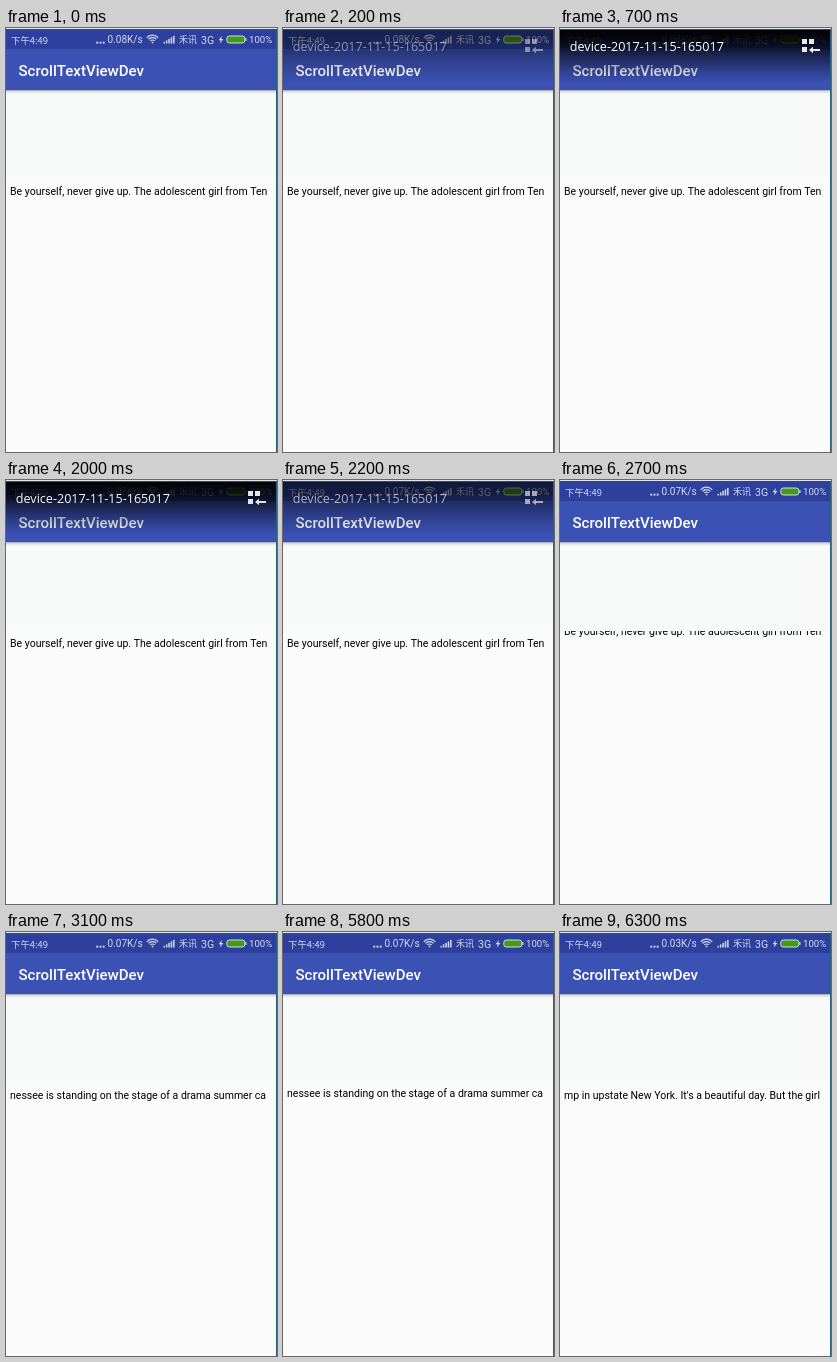
Animation of 271x424 px, one loop 8 s. Source, as an HTML page with a canvas:

```html
<!DOCTYPE html>
<html lang="en">
<head>
<meta charset="utf-8">
<title>Scrolling text view</title>
<style>
  html, body { margin: 0; width: 100%; height: 100%; overflow: hidden; background: #fafbfa; }
  canvas { display: block; width: 271px; height: 424px; }
</style>
</head>
<body>
<canvas id="stage"></canvas>
<script>
const W = 271, H = 424, LOOP = 8000, STEP = 100;
const ROBOTO = 'Roboto, sans-serif';
const CJK = '"Noto Sans CJK SC", "Noto Sans CJK", sans-serif';
const LINES = [
  'Be yourself, never give up. The adolescent girl from Ten',
  'nessee is standing on the stage of a drama summer ca',
  "mp in upstate New York. It's a beautiful day. But the girl"
];
const SCROLLS = [2580, 5780];
const VIEW = { top: 151, bottom: 176, base: 167.4, out: 29, into: 22, speed: 0.1 };

const canvas = document.getElementById('stage');
const ctx = canvas.getContext('2d');
const dpr = window.devicePixelRatio || 1;
canvas.width = W * dpr;
canvas.height = H * dpr;
ctx.scale(dpr, dpr);

const clamp = v => Math.max(0, Math.min(1, v));

function rect(x, y, w, h, color) {
  ctx.fillStyle = color;
  ctx.fillRect(x, y, w, h);
}

function text(str, x, y, font, color) {
  ctx.font = font;
  ctx.fillStyle = color;
  ctx.fillText(str, x, y);
}

function fade(y0, y1, stops) {
  const g = ctx.createLinearGradient(0, y0, 0, y1);
  for (const [at, alpha] of stops) g.addColorStop(at, `rgba(0,0,0,${alpha})`);
  rect(0, y0, 270, y1 - y0, g);
}

function polygon(points, color) {
  ctx.beginPath();
  points.forEach(([x, y]) => ctx.lineTo(x, y));
  ctx.closePath();
  ctx.fillStyle = color;
  ctx.fill();
}

function statusBar(speed) {
  const ink = '#d5daf0';
  rect(0, 2, 270, 19, '#2d409d');
  text('下午4:49', 5, 15.5, '9.4px ' + CJK, ink);
  for (let i = 0; i < 3; i++) rect(90.3 + i * 3.2, 13.7, 1.9, 1.9, ink);
  text(speed + 'K/s', 101.5, 15.4, '10px ' + ROBOTO, ink);

  // Wi-Fi arcs
  ctx.strokeStyle = ink;
  ctx.lineWidth = 1.2;
  for (const r of [2.8, 5.2, 7.6]) {
    ctx.beginPath();
    ctx.arc(146.5, 14.8, r, -Math.PI * 0.77, -Math.PI * 0.23);
    ctx.stroke();
  }
  rect(145.7, 13.7, 1.6, 1.6, ink);

  // Signal bars
  for (let i = 0; i < 5; i++) rect(157.5 + i * 2.4, 13.9 - i * 1.5, 1.5, 1.6 + i * 1.5, ink);

  text('禾讯', 173, 15.4, '9px ' + CJK, ink);
  text('3G', 195, 15.5, '10.6px ' + ROBOTO, ink);
  polygon([[216, 7.7], [212.6, 12.3], [214.8, 12.3], [213.8, 15.7], [217.4, 11], [215.2, 11]], ink);

  // Battery
  ctx.beginPath();
  ctx.roundRect(220.8, 8, 18, 7, 2.5);
  ctx.fillStyle = '#419c14';
  ctx.fill();
  ctx.lineWidth = 1;
  ctx.stroke();
  rect(239.3, 10, 1.2, 3, ink);
  text('100%', 243, 15.2, '9.6px ' + ROBOTO, ink);
}

function appBar() {
  rect(0, 21, 270, 41.2, '#3b51b4');
  text('ScrollTextViewDev', 12.5, 47.5, '500 15.06px ' + ROBOTO, '#fff');
}

// A line leaves through the top, then the next one enters from below.
function textView(t) {
  let line = 0, shift = 0;
  SCROLLS.forEach((start, i) => {
    if (t < start) return;
    const d = (t - start) * VIEW.speed;
    const leaving = d < VIEW.out;
    line = leaving ? i : i + 1;
    shift = leaving ? -d : Math.max(0, VIEW.out + VIEW.into - d);
  });
  ctx.save();
  ctx.beginPath();
  ctx.rect(0, VIEW.top, 267, VIEW.bottom - VIEW.top);
  ctx.clip();
  text(LINES[line], 4, VIEW.base + shift, '10.52px ' + ROBOTO, '#000');
  ctx.restore();
}

function overlay(alpha) {
  if (alpha <= 0) return;
  ctx.save();
  ctx.globalAlpha = alpha;
  fade(2, 55, [[0, 0.97], [0.2, 0.88], [0.5, 0.53], [0.8, 0.18], [1, 0]]);
  text('device-2017-11-15-165017', 9.8, 23, '500 12.6px "Open Sans", sans-serif', '#fff');
  const ink = '#ececec';
  rect(242, 11, 5, 5, ink);
  rect(249, 11, 5, 5, ink);
  rect(242, 19, 5, 5, ink);
  polygon([[249, 22], [253, 18.8], [253, 21], [260, 21], [260, 23], [253, 23], [253, 25.2]], ink);
  ctx.restore();
}

function overlayAlpha(t) {
  if (t < 200) return 0;
  if (t < 300) return 0.5;
  return clamp(1 - (t - 1980) / 640);
}

function draw(t) {
  rect(0, 0, W, H, '#fafbfa');
  rect(0, 0, W, 1, '#dfe6ea');
  rect(0, 1, W, 1, '#2b4f80');
  statusBar(t < 2000 ? '0.08' : t < 6000 ? '0.07' : '0.03');
  rect(0, 62, 270, 89, '#f8f9f9');
  fade(62, 66, [[0, 0.2], [1, 0]]);
  appBar();
  textView(t);
  overlay(overlayAlpha(t));
  rect(270, 2, 1, H - 2, '#2b617f');
}

const begin = performance.now();
function tick() {
  const t = (performance.now() - begin) % LOOP;
  draw(Math.floor(t / STEP) * STEP);
  requestAnimationFrame(tick);
}
tick();
</script>
</body>
</html>
```
